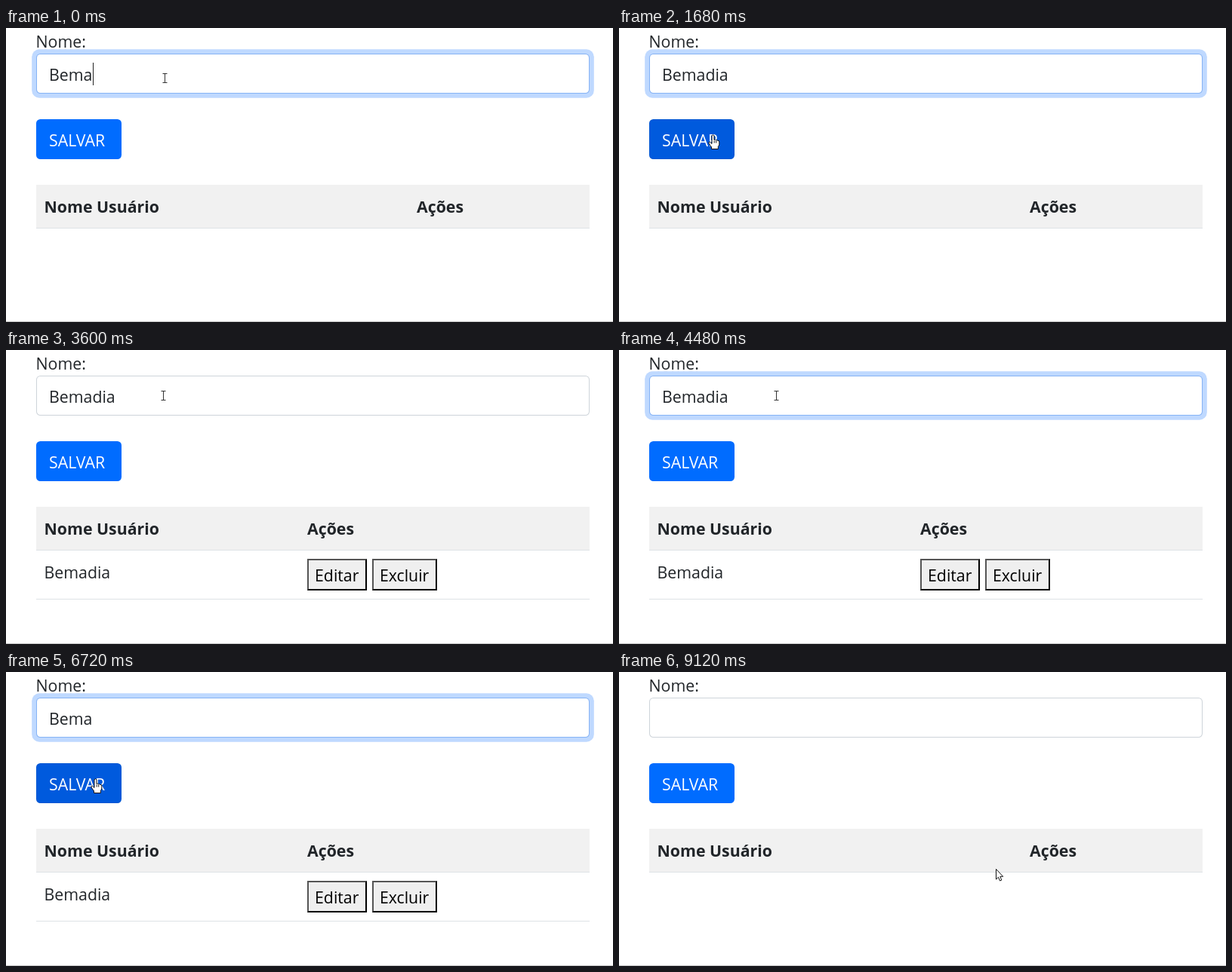
Recreate the animation shown at these times as an HTML page with a canvas. Size 804x390 px, loop 9.2 s.

```html
<!DOCTYPE html>
<html lang="pt">
<head>
<meta charset="utf-8">
<title>Cadastro de usuários</title>
<style>
  html, body { margin: 0; width: 100%; height: 100%; overflow: hidden; background: #fff; }
  canvas { display: block; }
</style>
</head>
<body>
<canvas id="stage" width="804" height="390"></canvas>
<script>
const ctx = document.getElementById("stage").getContext("2d");
const LOOP = 9200, STEP = 80;
const FONT = '"Open Sans", "Noto Sans", sans-serif';
const INK = "#212529";
const FULL = "Bemadia";
const SHORT = "Bema";

// Steps are [start time, value]; the last one reached holds.
const fieldSteps = [
  [0, SHORT], [240, "Bemad"], [480, "Bemadi"], [720, FULL], [2000, ""],
  [3200, FULL], [4560, "Bemadi"], [4720, "Bemad"], [5760, SHORT], [7200, ""]
];
const rowSteps = [[0, ""], [2000, FULL], [7200, SHORT], [8480, ""]];
const caretSteps = [
  [0, true], [1220, false], [1720, true], [1760, false], [3680, true], [4180, false],
  [4560, true], [4720, false], [4880, true], [5280, false], [5760, true],
  [6260, false], [6760, true], [6900, false]
];
const inputFocus = [[-500, 1760], [3600, 6880]];
const saveFocus = [[1760, 3120], [6880, 8320]];
const presses = [[1760, 2000], [3040, 3200], [6880, 7200], [8320, 8480]];

// Pointer keys: time, x, y of the hot spot.
const pointer = [
  [0, 210, 66], [960, 210, 66], [1440, 124, 141], [2000, 124, 141],
  [2640, 389, 291], [2800, 389, 291], [3040, 432, 296], [3280, 432, 296],
  [3600, 208, 60], [5760, 208, 60], [6240, 133, 113], [6480, 118, 141],
  [7200, 118, 141], [7680, 511, 301], [8560, 511, 301], [9120, 499, 261]
];

const boxes = {
  input: [40, 34, 733, 53],
  save: [40, 121, 113, 53],
  edit: [399, 277, 79, 42],
  remove: [485, 277, 86, 42]
};

const clamp = v => Math.max(0, Math.min(1, v));
const at = (steps, t) => steps.filter(s => s[0] <= t).pop()[1];
const within = (spans, t) => spans.some(([a, b]) => t >= a && t < b);
const fade = (spans, t) => Math.max(...spans.map(([a, b]) =>
  Math.min(clamp((t - a) / 150), 1 - clamp((t - b) / 150))));
const inside = ([x, y, w, h], p) => p.x >= x && p.x <= x + w && p.y >= y && p.y <= y + h;

function pointerAt(t) {
  let i = 0;
  while (i < pointer.length - 2 && pointer[i + 1][0] <= t) i++;
  const [t0, x0, y0] = pointer[i], [t1, x1, y1] = pointer[i + 1];
  const k = clamp((t - t0) / (t1 - t0)), e = k * k * (3 - 2 * k);
  return { x: Math.round(x0 + (x1 - x0) * e), y: Math.round(y0 + (y1 - y0) * e) };
}

function rect(x, y, w, h, color) {
  ctx.fillStyle = color;
  ctx.fillRect(x, y, w, h);
}

function rounded([x, y, w, h], grow, r, color) {
  ctx.fillStyle = color;
  ctx.beginPath();
  ctx.roundRect(x - grow, y - grow, w + grow * 2, h + grow * 2, r);
  ctx.fill();
}

function ring(box, color, alpha) {
  ctx.globalAlpha = alpha;
  rounded(box, 5.8, 10, color);
  ctx.globalAlpha = 1;
}

function text(str, x, y, color = INK, weight = 400) {
  ctx.font = `${weight} 21.3px ${FONT}`;
  ctx.fillStyle = color;
  ctx.fillText(str, x, y);
}

function drawInput(t) {
  const focus = fade(inputFocus, t), value = at(fieldSteps, t);
  ring(boxes.input, "#bfd9ff", focus);
  rounded(boxes.input, 0, 5.5, focus > 0.5 ? "#86b3f5" : "#ced4da");
  rounded(boxes.input, -1, 4.5, "#fff");
  text(value, 57, 70);
  if (at(caretSteps, t)) {
    rect(Math.round(57.5 + ctx.measureText(value).width), 46, 1, 30, "#222");
  }
}

function drawSave(t, p) {
  const focus = fade(saveFocus, t);
  const dark = focus > 0.5 || inside(boxes.save, p);
  ring(boxes.save, "#8fbcff", focus);
  rounded(boxes.save, 0, 5.5, dark ? "#0056d2" : "#006aff");
  rounded(boxes.save, -1, 4.5, dark ? "#005add" : "#006cff");
  text("SALVAR", 57, 156.5, "#fff");
}

function drawButton(box, label, pressed) {
  const [x, y, w, h] = box;
  rect(x, y, w, h, pressed ? "#555" : "#000");
  ctx.fillStyle = pressed ? "#000" : "#555";
  ctx.beginPath();
  ctx.moveTo(x, y + h);
  ctx.lineTo(x, y);
  ctx.lineTo(x + w, y);
  ctx.lineTo(x + w - 2, y + 2);
  ctx.lineTo(x + 2, y + 2);
  ctx.lineTo(x + 2, y + h - 2);
  ctx.fill();
  rect(x + 2, y + 2, w - 4, h - 4, "#efefef");
  text(label, x + 10, y + 30, "#000");
}

function drawTable(t, p) {
  const name = at(rowSteps, t), down = within(presses, t);
  rect(40, 208, 733, 57, "#f1f1f1");
  rect(40, 265, 733, 1, "#dee2e6");
  text("Nome Usuário", 50.5, 245, INK, 700);
  text("Ações", name ? 399 : 544, 245, INK, 700);
  if (!name) return;
  text(name, 50.5, 303);
  drawButton(boxes.edit, "Editar", down && inside(boxes.edit, p));
  drawButton(boxes.remove, "Excluir", down && inside(boxes.remove, p));
  rect(40, 330, 733, 1, "#dee2e6");
}

const arrow = new Path2D("M0 0V13.5L3 10.7L5 15.5L7.3 14.5L5.3 9.8H9.2Z");
const hand = new Path2D("M-1.5 1.3Q0 -1 1.5 1.3V7Q3 5.8 4 7.4Q5.5 6.5 6.3 8Q8.3 7.3 8.3 9.5V13.5L6.8 16V19H-2V16.5L-5.5 11.5Q-6 9.3 -4 9.7L-1.5 12Z");

function drawPointer(p, overButton) {
  ctx.save();
  ctx.translate(p.x + 0.5, p.y + 0.5);
  if (inside(boxes.input, p)) {
    ctx.strokeStyle = "#333";
    ctx.lineWidth = 1;
    ctx.beginPath();
    ctx.moveTo(-3, -6);
    ctx.lineTo(3, -6);
    ctx.moveTo(0, -6);
    ctx.lineTo(0, 6);
    ctx.moveTo(-3, 6);
    ctx.lineTo(3, 6);
    ctx.stroke();
  } else {
    const shape = overButton ? hand : arrow;
    ctx.fillStyle = "#fff";
    ctx.strokeStyle = "#111";
    ctx.lineWidth = 1;
    ctx.lineJoin = "round";
    ctx.fill(shape);
    ctx.stroke(shape);
    if (overButton) {
      for (const x of [1.7, 4.2]) {
        ctx.beginPath();
        ctx.moveTo(x, 8);
        ctx.lineTo(x, 11);
        ctx.stroke();
      }
    }
  }
  ctx.restore();
}

function draw(t) {
  const p = pointerAt(t);
  rect(0, 0, 804, 390, "#fff");
  text("Nome:", 39.5, 26);
  drawInput(t);
  drawSave(t, p);
  drawTable(t, p);
  rect(0, 389, 804, 1, "#c8c8c8");
  const rowButton = at(rowSteps, t) && (inside(boxes.edit, p) || inside(boxes.remove, p));
  drawPointer(p, inside(boxes.save, p) || rowButton);
}

const start = performance.now();
function tick() {
  const t = (performance.now() - start) % LOOP;
  draw(Math.floor(t / STEP) * STEP);
  requestAnimationFrame(tick);
}
tick();
</script>
</body>
</html>
```
